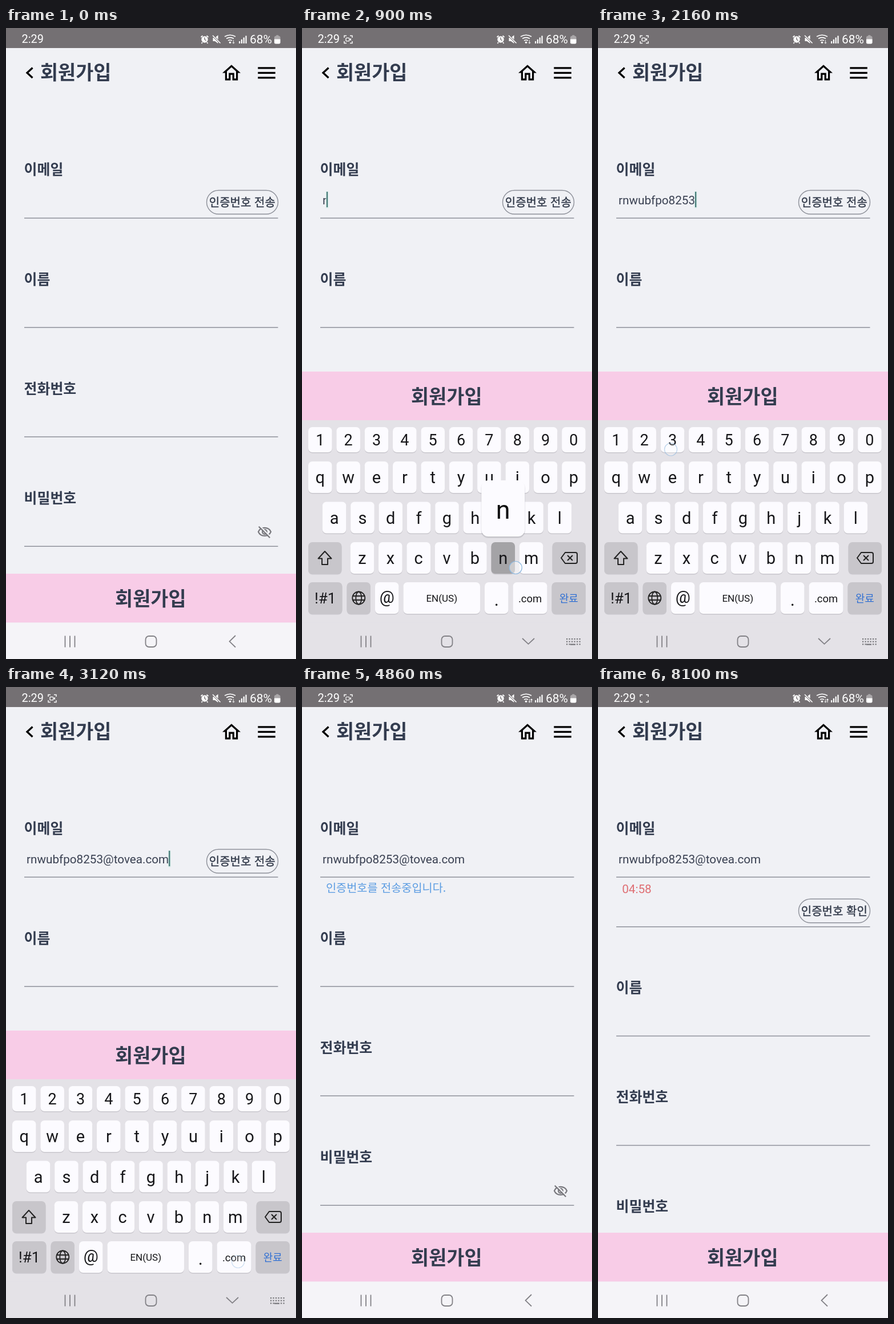
Animation of 508 by 1102 pixels, one loop 8.4 s. Source, as an HTML page:

```html
<!DOCTYPE html>
<html lang="ko">
<head>
<meta charset="utf-8">
<title>회원가입</title>
<style>
  html, body { margin: 0; width: 100%; height: 100%; overflow: hidden; background: #f0f1f5; }
  svg { display: block; width: 100vw; height: 100vh; }
  text { font-family: Roboto, "Noto Sans CJK KR", sans-serif; white-space: pre; }
  .ko { font-family: "Noto Sans CJK KR", "Noto Sans CJK", sans-serif; }
  .bold { font-weight: 700; fill: #333c4f; }
  .mid { text-anchor: middle; }
</style>
</head>
<body>
<svg id="stage" viewBox="0 0 508 1102"></svg>
<script>
const LOOP = 8400, LIFT = 353, SHIFT = 86.5;
const USER = [...'rnwubfpo8253'], HOST = [...'@tovea', '.com'];
const MESSAGE_AT = 4260, CODE_AT = 6720;
const HOLD = 80, FADE = 100;

const rect = (x, y, w, h, fill, r = 0, more = '') =>
  `<rect x="${x}" y="${y}" width="${w}" height="${h}" rx="${r}" fill="${fill}" ${more}/>`;
const text = (x, y, size, str, more = '') =>
  `<text x="${x}" y="${y}" font-size="${size}" ${more}>${str}</text>`;
const stroke = (d, color, w, more = '') =>
  `<path d="${d}" fill="none" stroke="${color}" stroke-width="${w}" ${more}/>`;
const group = (id, body, more = '') => `<g id="${id}" ${more}>${body}</g>`;
const rule = y => stroke(`M32 ${y}H476.5`, '#8e919a', 1.6);
const label = (y, str) => text(31.6, y, 24.9, str, 'class="ko bold"');
const pill = (y, str) =>
  rect(351.5, y, 125, 41.5, 'none', 20.7, 'stroke="#8d9099" stroke-width="1.4"') +
  text(413.8, y + 28.8, 20, str,
    'class="ko mid" fill="#2f3747" stroke="#2f3747" stroke-width=".35"');

// Keyboard geometry
const keys = {};
function addKey(id, x, y, w, h, touch, opts = {}) {
  keys[id] = { id, x, y, w, h, touch, size: 29, base: 38, fill: '#fcfbff', ...opts };
}
function addRow(chars, x, y, h, touch, opts) {
  [...chars].forEach((c, i) => addKey(c, x + i * 49.35, y, 41.6, h, touch, { popup: true, ...opts }));
}
const gray = { fill: '#c8c6cb' };
addRow('1234567890', 11, 697, 44, [-3, 17], { size: 27, base: 32 });
addRow('qwertyuiop', 11, 757, 55, [8, 14]);
addRow('asdfghjkl', 35.8, 827.5, 55, [8, 14]);
addKey('shift', 11, 898, 58.5, 55, [0, 0], { ...gray, label: '' });
addRow('zxcvbnm', 84.7, 898, 55, [22, 17]);
addKey('del', 438.5, 898, 58.5, 55, [0, 0], { ...gray, label: '' });
const low = [7, 8];
addKey('!#1', 11, 968, 59.5, 55, low, { ...gray, size: 26, base: 37 });
addKey('globe', 78.5, 968, 41.5, 55, low, { ...gray, label: '' });
addKey('@', 128, 968, 41.5, 55, low, { size: 29, base: 36 });
addKey('EN(US)', 177.5, 968, 134.5, 55, low, { size: 17, base: 34 });
addKey('.', 320, 968, 41.5, 55, low, { size: 31, base: 41 });
addKey('.com', 369.5, 968, 60, 55, low, { size: 18.4, base: 35 });
addKey('완료', 437.5, 968, 59.5, 55, low, { ...gray, size: 18, base: 35, ink: '#2f6fd3' });

const midX = k => k.x + k.w / 2;
const drawKey = k =>
  rect(k.x, k.y + 1.6, k.w, k.h, '#c9c7cd', 7) +
  rect(k.x, k.y, k.w, k.h, k.fill, 7, `data-key="${k.id}"`) +
  text(midX(k), k.y + k.base, k.size, k.label ?? k.id, `class="mid" fill="${k.ink || '#17171a'}"`);

const keyIcons =
  stroke('M40 914L51.5 926.5H45V937H35V926.5H28.5Z', '#222', 2, 'stroke-linejoin="round"') +
  stroke('M461 916H479Q482 916 482 919V932Q482 935 479 935H461L454 925.5ZM465 921L474 930M474 921L465 930',
    '#222', 2, 'stroke-linejoin="round"') +
  `<g fill="none" stroke="#222" stroke-width="1.8"><circle cx="99.3" cy="995.5" r="11"/>
   <ellipse cx="99.3" cy="995.5" rx="5" ry="11"/><path d="M88.5 992H110M88.5 999H110"/></g>`;

// Status bar
const clock = (x, y) =>
  `<circle cx="${x}" cy="${y}" r="5.7" fill="#fff"/>` +
  stroke(`M${x} ${y - 3.5}V${y}L${x + 2.5} ${y + 2}`, '#747073', 1.4) +
  stroke(`M${x - 6.5} ${y - 4}L${x - 3.5} ${y - 6.5}M${x + 6.5} ${y - 4}L${x + 3.5} ${y - 6.5}M${x - 4} ${y + 5}L${x - 5.5} ${y + 7}M${x + 4} ${y + 5}L${x + 5.5} ${y + 7}`, '#fff', 1.7);
const wifi = [4, 7.5, 11].map(r =>
  stroke(`M${392.5 - r * .86} ${26 - r}Q392.5 ${26 - r * 1.5} ${392.5 + r * .86} ${26 - r}`, '#fff', 1.7)).join('');
const bars = [0, 1, 2, 3].map(i =>
  rect(408 + i * 3.8, 23 - i * 3.2, 2.2, 4 + i * 3.2, '#fff', .6)).join('');
const status =
  rect(0, 0, 508, 35, '#747073') +
  text(27.5, 26.3, 20, '2:29', 'fill="#fff"') +
  clock(348, 20) +
  '<path d="M362.5 17H366L371.5 12.5V27L366 23H362.5Z" fill="#fff"/>' +
  stroke('M362 13L375.5 26.5', '#747073', 3.4) + stroke('M362 13L375.5 26.5', '#fff', 1.6) +
  wifi + '<circle cx="392.5" cy="25.3" r="1.8" fill="#fff"/>' +
  stroke('M398.5 21V27M396.8 25.2L398.5 27L400.2 25.2', '#ddd', 1.1) +
  group('upload', stroke('M402 27V21M400.5 22.8L402 21L403.5 22.8', '#fff', 1.1)) +
  bars + text(427, 26.5, 21, '68%', 'fill="#fff"') +
  rect(470, 14, 10.5, 13.5, '#aaa7a9', 2.5) + rect(473, 12.5, 4.5, 3, '#aaa7a9', 1) +
  '<path d="M470 19.5H480.5V25Q480.5 27.5 478 27.5H472.5Q470 27.5 470 25Z" fill="#fff"/>' +
  group('recorder',
    stroke('M78 13.5H74V17M84 13.5H88V17M74 23V26.5H78M88 23V26.5H84', '#fff', 1.4) +
    group('camera', rect(77, 17.3, 5.8, 5.6, 'none', 1, 'stroke="#fff" stroke-width="1.3"') +
      '<path d="M83 20L86 17.5V22.5Z" fill="#fff"/>'));

const header =
  stroke('M46.5 69.5L37 78.3L46.5 87', '#000', 3.3) +
  text(60, 90.4, 33.8, '회원가입', 'class="ko bold"') +
  `<path transform="translate(375.8 59.4) scale(1.6)"
    d="M12 5.7L17 10.2V18H15V12H9V18H7V10.2ZM12 3L2 12H5V20H11V14H13V20H19V12H22Z"/>` +
  stroke('M441.3 69.8H471.8M441.3 78.3H471.8M441.3 86.8H471.8', '#000', 3.2);

const eye = `<g transform="translate(439.8 867.3) scale(1.1)">` +
  stroke('M2 11.5C5.5 3 18.5 3 22 11.5C18.5 20 5.5 20 2 11.5Z', '#77777c', 2) +
  '<circle cx="12" cy="11.5" r="3.5" fill="none" stroke="#77777c" stroke-width="2"/>' +
  stroke('M4.1 1.8L21.8 19.5', '#f0f1f5', 2) + stroke('M2.7 3.2L20.4 20.9', '#77777c', 2) + '</g>';

const form =
  label(256.3, '이메일') + rule(332) +
  text(36, 307.5, 20.7, '', 'id="email" fill="#3a4152"') +
  group('cursor', rect(-2, 285, 5, 30, '#cfe9e6', 2, 'opacity=".7"') + rect(-.6, 286, 2.2, 27, '#467a77')) +
  group('send', pill(283.5, '인증번호 전송')) +
  group('message', text(42, 358.3, 19.7, '인증번호를 전송중입니다.', 'class="ko" fill="#5b9ce2"')) +
  group('verify', text(42.2, 360.3, 20.7, '', 'id="timer" fill="#df6e73"') +
    pill(370.3, '인증번호 확인') + rule(418.8)) +
  group('rows', label(447.8, '이름') + rule(523) + label(638.8, '전화번호') + rule(714) +
    label(829.6, '비밀번호') + rule(905.3) + eye);

const submit = group('submit',
  rect(0, 953, 508, 85.5, '#f8cce7') +
  text(253.3, 1008.9, 33.8, '회원가입', 'class="ko bold mid"'));

const board = group('board',
  rect(0, 685, 508, 417, '#e4e2e7') + Object.values(keys).map(drawKey).join('') + keyIcons);

const dots = [0, 1, 2].map(r => Array.from({ length: 6 }, (_, c) =>
  r === 2 && c > 1 && c < 4 ? '' : rect(463 + c * 4.5, 1066 + r * 4.6, 2.2, 2.2, '#77777b')).join('')).join('') +
  rect(470, 1075.5, 9, 2.2, '#77777b');
const nav =
  rect(0, 1038.5, 508, 64, '#f5f4f8', 0, 'id="navBack"') +
  stroke('M103.5 1061.5V1081.5M112 1061.5V1081.5M120.5 1061.5V1081.5', '#828186', 1.8) +
  rect(244.5, 1062, 19, 19, 'none', 6, 'stroke="#828186" stroke-width="1.8"') +
  group('back', stroke('M402 1061L391.5 1071.3L402 1081.5', '#828186', 1.8)) +
  group('hide', stroke('M386 1066L396.5 1075.8L407 1066', '#828186', 1.8) + dots);

const popup = group('popup',
  rect(0, 3, 76, 98, '#77757c', 12, 'opacity=".16"') + rect(-1, 1, 78, 99, '#77757c', 13, 'opacity=".12"') +
  rect(0, 0, 76, 98, '#fcfbff', 12) +
  text(38, 67, 45, '', 'id="popupText" class="mid" fill="#111"'));
const touch = '<circle id="touch" r="11" fill="#fff" fill-opacity=".45" stroke="#8fb9df" stroke-width="1.2"/>';

document.getElementById('stage').innerHTML =
  rect(0, 0, 508, 1102, '#f0f1f5') + form + header + submit + board + nav + status + popup + touch;

const el = Object.fromEntries([...document.querySelectorAll('[id]')].map(e => [e.id, e]));
const caps = Object.fromEntries([...document.querySelectorAll('[data-key]')].map(e => [e.dataset.key, e]));
const presses = [
  ...USER.map((id, i) => ({ id, at: 720 + i * 120 })),
  ...HOST.map((id, i) => ({ id, at: 2280 + i * 117 }))
];

const clamp = v => Math.min(1, Math.max(0, v));
const ramp = (t, a, b) => clamp((t - a) / (b - a));
const easeOut = p => 1 - (1 - p) ** 3;
const show = (e, on) => e.setAttribute('display', on ? 'inline' : 'none');
const move = (e, x, y) => e.setAttribute('transform', `translate(${x} ${y})`);
const setText = (e, s) => { if (e.textContent !== s) e.textContent = s; };

function keyboardLevel(t) {
  if (t < 60) return 0;
  return t < 3420 ? easeOut(ramp(t, 20, 400)) : 1 - easeOut(ramp(t, 3380, 3720));
}

// The camera mark fades out and in by turns, then cuts off
function cameraLevel(t) {
  if (t >= 8100) return 0;
  if (t >= 7800) return ramp(t, 7740, 7920);
  if (t < 4860) return 1;
  const step = Math.floor((t - 4860) / 600);
  const p = ramp((t - 4860) % 600, -60, 300);
  return step % 2 ? p : 1 - p;
}

function drawTyping(t) {
  setText(el.email, presses.filter(p => t >= p.at + HOLD).map(p => p.id).join(''));
  const last = presses.filter(p => t >= p.at).pop();
  const age = last ? t - last.at : Infinity;
  const down = age < HOLD;
  for (const id in caps) caps[id].setAttribute('fill', down && id === last.id ? '#a4a3a6' : keys[id].fill);

  const key = last && keys[last.id];
  show(el.popup, down && key.popup);
  show(el.touch, age < HOLD + FADE);
  if (!key) return;
  move(el.popup, Math.min(425, Math.max(8, midX(key) - 38)), key.y - 108);
  setText(el.popupText, key.id);
  move(el.touch, midX(key) + key.touch[0], key.y + key.h / 2 + key.touch[1]);
  el.touch.setAttribute('opacity', 1 - ramp(age, HOLD, HOLD + FADE));
}

function render(t) {
  const level = keyboardLevel(t), open = level > .001;
  move(el.submit, 0, -LIFT * level);
  move(el.board, 0, LIFT * (1 - level));
  show(el.board, open);
  show(el.back, !open);
  show(el.hide, open);
  el.navBack.setAttribute('fill', open ? '#e4e2e7' : '#f5f4f8');

  drawTyping(t);
  show(el.cursor, t >= 60 && t < 3420);
  const length = el.email.textContent ? el.email.getComputedTextLength() : 0;
  move(el.cursor, 36.5 + length, 0);

  const verifying = t >= CODE_AT;
  show(el.send, t < MESSAGE_AT);
  show(el.message, t >= MESSAGE_AT && !verifying);
  show(el.verify, verifying);
  move(el.rows, 0, verifying ? SHIFT : 0);
  setText(el.timer, t < 7260 ? '05:00' : t < 8100 ? '04:59' : '04:58');

  el.recorder.setAttribute('opacity', t < 60 ? 0 : ramp(t, 0, 360));
  el.camera.setAttribute('opacity', cameraLevel(t));
  show(el.upload, t >= MESSAGE_AT);
}

const start = performance.now();
function tick() {
  render((performance.now() - start) % LOOP);
  requestAnimationFrame(tick);
}
tick();
</script>
</body>
</html>
```
